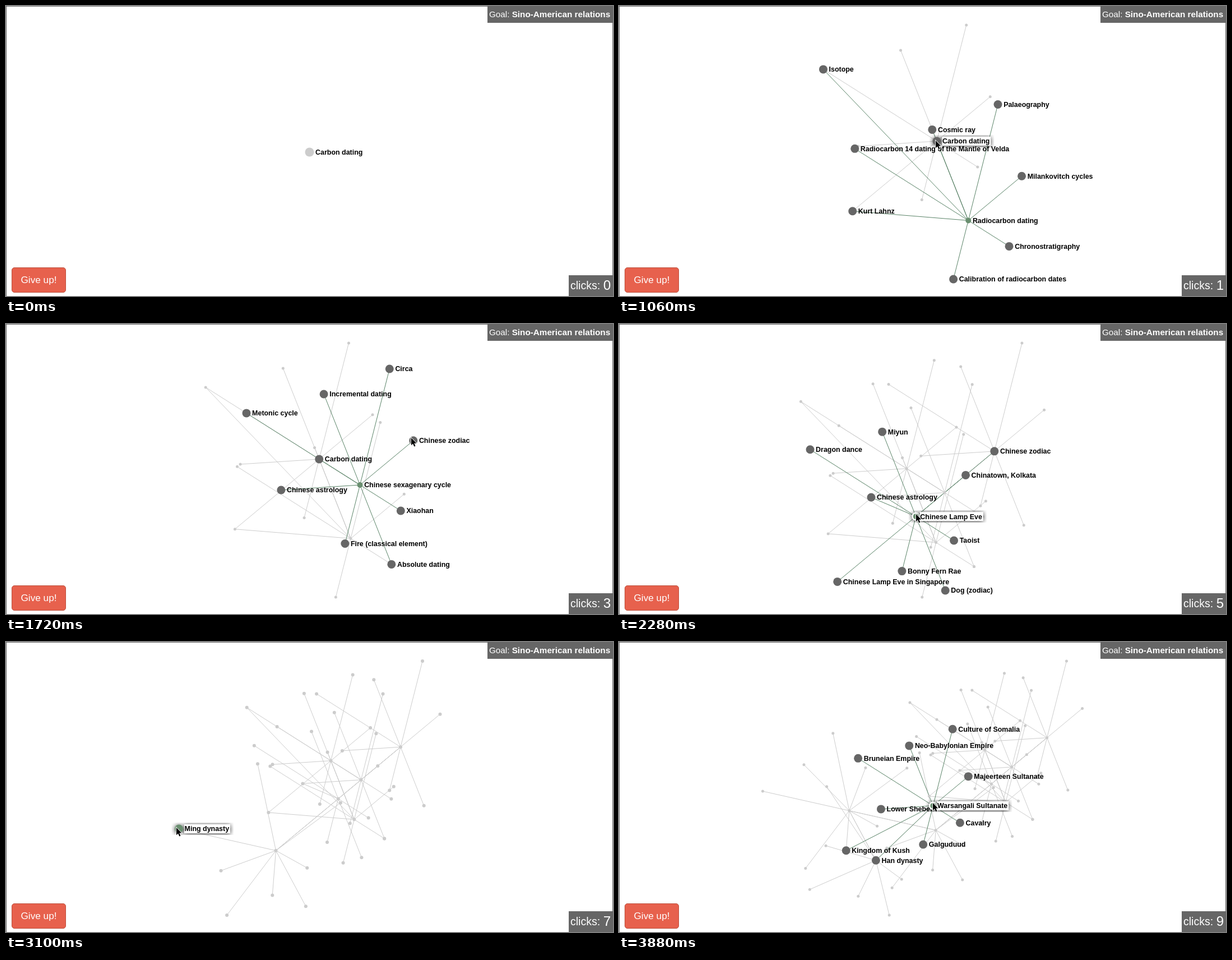
These frames come from a looping animation (1083 by 517 pixels, 3.92 s). An HTML page with a canvas:

```html
<!DOCTYPE html>
<html lang="en">
<head>
<meta charset="utf-8">
<title>Link graph game</title>
<style>
  html, body { margin: 0; width: 100%; height: 100%; overflow: hidden; background: #fff; }
  body { position: relative; font-family: "Liberation Sans", Arial, sans-serif; color: #fff; }
  canvas { position: absolute; left: 0; top: 0; }
  .edge { position: absolute; inset: 0; border: 1px solid #666; border-bottom: 0; }
  .bar { position: absolute; right: 0; background: #666; white-space: nowrap; box-sizing: border-box; }
  .goal { top: 0; width: 224px; height: 30px; padding-left: 3px; font-size: 15.25px; line-height: 30px; }
  .clicks { bottom: 0; width: 79px; height: 37px; padding-left: 3px; font-size: 19.5px; line-height: 37px; }
  .clicks span { position: absolute; right: 4px; top: 0; font-size: 24px; line-height: 36px; }
  .quit { position: absolute; left: 10px; top: 466px; width: 97px; height: 45px; box-sizing: border-box;
    border: 1px solid #bd513e; border-radius: 5px; background: #e7614d;
    font-size: 17.2px; line-height: 42px; text-align: center; }
</style>
</head>
<body>
<div class="edge"></div>
<div class="bar goal">Goal: <b>Sino-American relations</b></div>
<div class="quit">Give up!</div>
<div class="bar clicks">clicks: <span id="count">0</span></div>
<canvas id="stage" width="1083" height="517"></canvas>
<script>
const LOOP = 3920;
const ctx = document.getElementById('stage').getContext('2d');
const counter = document.getElementById('count');

const GREEN = [106, 143, 112], DARK = [102, 102, 102], LIGHT = [204, 204, 204];
const LINK = [88, 130, 102];

// Links of each page, in angular order.
const PAGES = {
  'Carbon dating': 'Chinese sexagenary cycle|Radiocarbon dating|Stratigraphy (archaeology)|Kurt Lahnz|Electron|Isotope|Galactic year|Limestone|Thylacine',
  'Radiocarbon dating': 'Chronostratigraphy|Carbon dating|Calibration of radiocarbon dates|Kurt Lahnz|Isotope|Radiocarbon 14 dating of the Mantle of Velda|Cosmic ray|Palaeography|Milankovitch cycles',
  'Chinese sexagenary cycle': 'Xiaohan|Absolute dating|Fire (classical element)|Carbon dating|Chinese astrology|Metonic cycle|Incremental dating|Circa|Chinese zodiac',
  'Chinese zodiac': 'Chinese sexagenary cycle|Rat (zodiac)|Ox (zodiac)|Chinese Lamp Eve|Jupiter|Ecliptic|Snake (zodiac)|Astrology|Tiger (zodiac)',
  'Chinese Lamp Eve': 'Taoist|Dog (zodiac)|Bonny Fern Rae|Chinese Lamp Eve in Singapore|Chinese astrology|Dragon dance|Miyun|Chinese zodiac|Chinatown, Kolkata',
  'Chinese Lamp Eve in Singapore': 'Lantern|Lion dance|Hokkien|Firecracker|Mandarin orange|Ming dynasty|Chinese Lamp Eve|Calligraphy|Chinatown, Kolkata|Tea',
  'Ming dynasty': 'Porcelain|Han dynasty|Kingdom of Kush|Pagoda|Chinese Lamp Eve in Singapore|Confucianism|Bronze|Silk|Rice|Eunuch',
  'Han dynasty': 'Paper|Iron|Lacquer|Seismometer|Crossbow|Chariot|Ming dynasty|Warsangali Sultanate',
  'Warsangali Sultanate': 'Cavalry|Kingdom of Kush|Galguduud|Han dynasty|Lower Shebelle|Bruneian Empire|Neo-Babylonian Empire|Culture of Somalia|Majeerteen Sultanate'
};
const RADII = [112, 198, 140.4, 254, 183.3, 311.6, 226.7, 277.7, 161, 252];

// Page, click time, expand time, settle duration.
const VISITS = [
  ['Carbon dating', 0, 50, 220],
  ['Radiocarbon dating', 640, 710, 180],
  ['Carbon dating', 1100, 1100, 150],
  ['Chinese sexagenary cycle', 1370, 1430, 180],
  ['Chinese zodiac', 1760, 1820, 180],
  ['Chinese Lamp Eve', 2050, 2100, 160],
  ['Chinese Lamp Eve in Singapore', 2480, 2540, 180],
  ['Ming dynasty', 3060, 3120, 180],
  ['Han dynasty', 3370, 3420, 150],
  ['Warsangali Sultanate', 3610, 3660, 160]
];

// Pointer stops: time, x, y.
const POINTER = [
  [380, 770, 400], [560, 682, 485], [860, 682, 485], [1030, 565, 240], [1160, 565, 240],
  [1310, 638, 285], [1540, 638, 285], [1720, 723, 203], [1750, 726, 206], [1880, 726, 206],
  [2030, 530, 339], [2310, 530, 339], [2450, 387, 457], [2700, 387, 457], [3020, 304, 331],
  [3210, 304, 331], [3350, 446, 429], [3450, 446, 429], [3590, 560, 287]
];

const nodes = [], byName = {}, links = [], stages = [];
const lerp = (a, b, p) => a + (b - a) * p;
const clamp = v => Math.max(0, Math.min(1, v));
const ease = p => p < .5 ? 4 * p ** 3 : 1 - (2 - 2 * p) ** 3 / 2;
const mix = (a, b, p) => a.map((v, i) => lerp(v, b[i], p));
const rgb = c => `rgb(${c.map(Math.round)})`;

function addNode(name, x, y, parent) {
  nodes.push(byName[name] = { name, x, y, parent, id: nodes.length });
}

function expand(name) {
  const from = byName[name], names = PAGES[name].split('|');
  names.forEach((child, i) => {
    const a = ((i + 1) * 360 / (names.length + 1) - 3.7) * Math.PI / 180;
    if (!byName[child]) addNode(child, from.x + RADII[i] * Math.cos(a), from.y + RADII[i] * Math.sin(a), from);
    links.push({ from, to: byName[child] });
  });
}

// Fit all nodes to the height of the stage.
function fit() {
  const xs = nodes.map(n => n.x), ys = nodes.map(n => n.y);
  const left = Math.min(...xs), right = Math.max(...xs), top = Math.min(...ys), bottom = Math.max(...ys);
  return { k: bottom > top ? 453 / (bottom - top) : 1, cx: (left + right) / 2, cy: (top + bottom) / 2 };
}

function addStage(time, dur, name, loading) {
  const near = new Set(loading ? [] : PAGES[name].split('|'));
  stages.push({ time, dur, name, loading, near, view: fit(), nodeCount: nodes.length, linkCount: links.length });
}

addNode('Carbon dating', 0, 0, null);
const opened = new Set();
for (const [name, click, open, dur] of VISITS) {
  if (open > click || click === 0) addStage(click, 30, name, true);
  if (!opened.has(name)) expand(name);
  opened.add(name);
  addStage(open, dur, name, false);
}

function pose(stage, node) {
  const { k, cx, cy } = stage.view;
  const born = node.id < stage.nodeCount, at = born ? node : node.parent;
  const p = { x: 541.5 + (at.x - cx) * k, y: 260.5 + (at.y - cy) * k, r: stage.loading ? 3 : 2.5, color: LIGHT, label: 0 };
  if (!born) p.r = 0;
  else if (node.name === stage.name) {
    p.label = 1;
    p.r = stage.loading ? 7.5 : 5;
    p.color = GREEN;
    if (stage === stages[0]) { p.r = 8; p.color = LIGHT; }
  } else if (stage.near.has(node.name)) {
    p.label = 1;
    p.r = 7.5;
    p.color = DARK;
  }
  return p;
}

function blend(a, b, p) {
  return {
    x: lerp(a.x, b.x, p), y: lerp(a.y, b.y, p), r: lerp(a.r, b.r, p),
    label: lerp(a.label, b.label, p), color: mix(a.color, b.color, p)
  };
}

function pointerAt(t) {
  if (t < POINTER[0][0]) return null;
  const next = POINTER.findIndex(s => s[0] > t);
  if (next < 0) return POINTER[POINTER.length - 1].slice(1);
  const a = POINTER[next - 1], b = POINTER[next];
  const p = ease((t - a[0]) / (b[0] - a[0]));
  return [lerp(a[1], b[1], p), lerp(a[2], b[2], p)];
}

function disc(x, y, r, fill) {
  ctx.fillStyle = fill;
  ctx.beginPath();
  ctx.arc(x, y, r, 0, 7);
  ctx.fill();
}

function drawLabel(node, p) {
  ctx.globalAlpha = p.label;
  ctx.fillStyle = '#000';
  ctx.fillText(node.name, p.x + p.r + 2.6, p.y + 4.4);
  ctx.globalAlpha = 1;
}

function drawHover(node, p) {
  const x = p.x + p.r + 2, width = ctx.measureText(node.name).width + 2.5;
  ctx.save();
  ctx.beginPath();
  ctx.rect(p.x - 13, p.y - 11, x + width - p.x + 19, 22);
  ctx.clip();
  ctx.shadowColor = 'rgba(0,0,0,.8)';
  ctx.shadowBlur = 8;
  ctx.shadowOffsetY = 1;
  disc(p.x, p.y, Math.max(p.r, 7.5), '#fff');
  ctx.fillRect(x, p.y - 8, width, 16);
  ctx.restore();
  disc(p.x, p.y, p.r, rgb(p.color));
  drawLabel(node, p);
}

function drawPointer([x, y]) {
  ctx.save();
  ctx.translate(x, y);
  ctx.scale(.85, .85);
  ctx.beginPath();
  [[0, 0], [0, 15.5], [3.6, 12.2], [6.2, 18.2], [8.8, 17], [6.2, 11.3], [11, 11.3]].forEach(q => ctx.lineTo(...q));
  ctx.closePath();
  ctx.fillStyle = '#000';
  ctx.strokeStyle = '#fff';
  ctx.lineWidth = 2;
  ctx.stroke();
  ctx.fill();
  ctx.restore();
}

function drawLinks(poses, was, now, p) {
  const strength = (stage, link) => !stage.loading && link.from.name === stage.name ? 1 : 0;
  const list = links.slice(0, now.linkCount).map((link, i) => ({
    link,
    glow: lerp(strength(was, link), strength(now, link), p),
    alpha: i < was.linkCount ? 1 : p
  }));
  list.sort((a, b) => a.glow - b.glow);
  ctx.lineWidth = 1;
  for (const { link, glow, alpha } of list) {
    const a = poses[link.from.id], b = poses[link.to.id];
    ctx.globalAlpha = alpha;
    ctx.strokeStyle = rgb(mix(LIGHT, LINK, glow));
    ctx.beginPath();
    ctx.moveTo(a.x, a.y);
    ctx.lineTo(b.x, b.y);
    ctx.stroke();
  }
  ctx.globalAlpha = 1;
}

function draw(t) {
  let i = stages.length - 1;
  while (stages[i].time > t) i--;
  const now = stages[i], was = stages[Math.max(0, i - 1)];
  const p = ease(clamp((t - now.time) / now.dur));
  const shown = nodes.slice(0, now.nodeCount);
  const poses = shown.map(n => blend(pose(was, n), pose(now, n), p));
  const tip = pointerAt(t);

  ctx.clearRect(0, 0, 1083, 517);
  ctx.font = 'bold 12.45px "Liberation Sans", Arial, sans-serif';
  drawLinks(poses, was, now, p);
  shown.forEach((n, j) => disc(poses[j].x, poses[j].y, poses[j].r, rgb(poses[j].color)));
  shown.forEach((n, j) => { if (poses[j].label > 0) drawLabel(n, poses[j]); });

  if (tip) {
    const hit = shown.find((n, j) => poses[j].label > .3 && Math.hypot(poses[j].x - tip[0], poses[j].y - tip[1]) < 6);
    if (hit) drawHover(hit, poses[hit.id]);
    drawPointer(tip);
  }
  counter.textContent = VISITS.filter(v => v[1] <= t).length - 1;
}

const start = performance.now();
function tick() {
  draw((performance.now() - start) % LOOP);
  requestAnimationFrame(tick);
}
tick();
</script>
</body>
</html>
```
